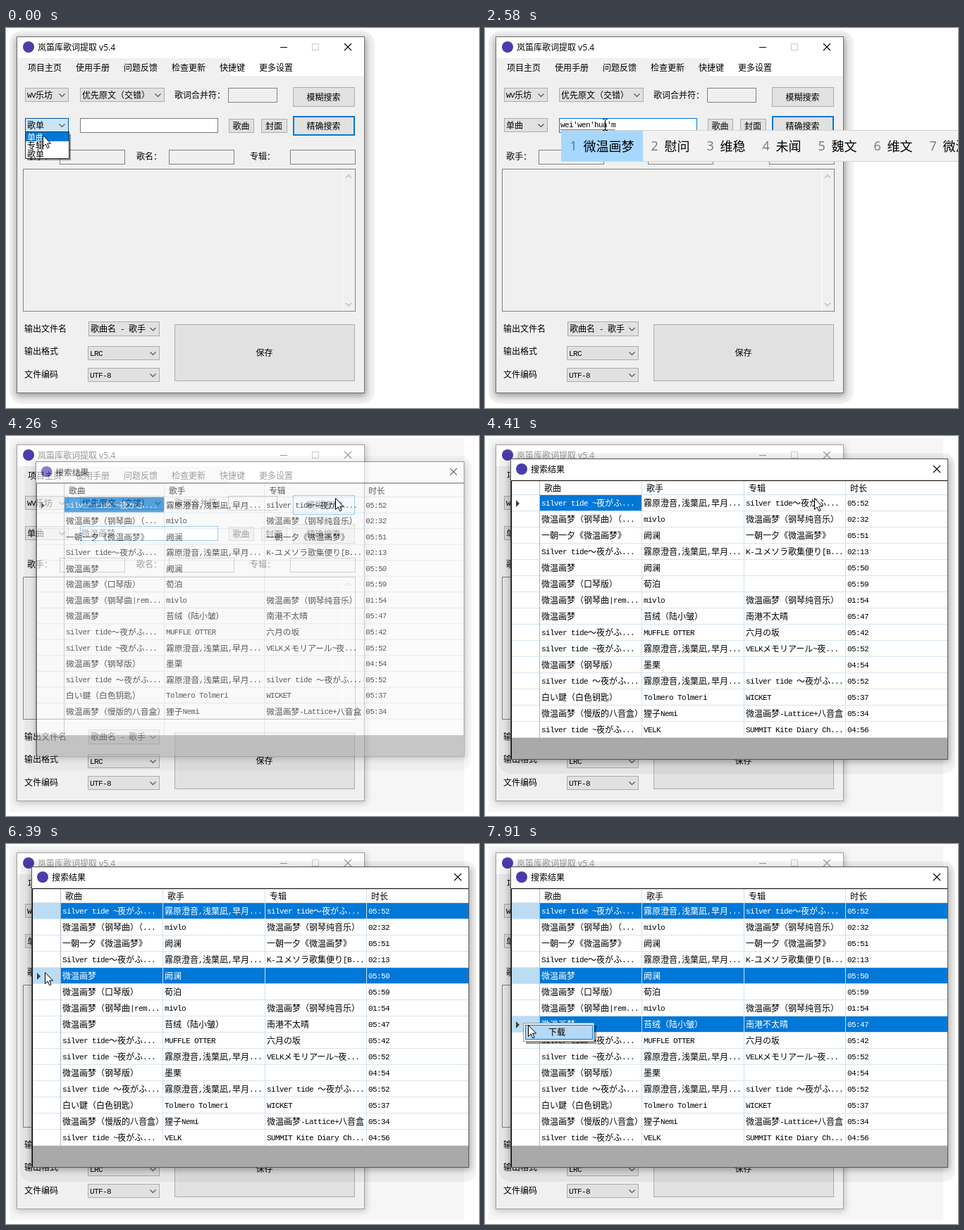
Animation, 671 px wide and 540 px high, one loop 8000 ms. Source, as an HTML page:

```html
<!DOCTYPE html>
<html lang="zh-CN">
<head>
<meta charset="utf-8">
<title>歌词提取</title>
<style>
  html, body { margin: 0; width: 100%; height: 100%; overflow: hidden; background: #fff; }
  svg { display: block; width: 100%; height: 100%; }
  text { font: 12px "Noto Sans CJK SC", "Noto Sans CJK", sans-serif; white-space: pre; }
  .m { font: 11px "Liberation Mono", monospace; letter-spacing: -.6px; baseline-shift: 1px; }
  .u { font-family: "Open Sans", "Noto Sans CJK SC", "Noto Sans CJK", sans-serif; }
  .ime { font-size: 18px; }
</style>
</head>
<body>
<svg viewBox="0 0 671 540" preserveAspectRatio="none">
  <defs>
    <filter id="soft" x="-10%" y="-10%" width="120%" height="120%"><feGaussianBlur stdDeviation="5"/></filter>
  </defs>
  <g id="scene"></g>
</svg>
<script>
const LOOP = 8000;
const BLUE = '#0078d7', EDGE = '#adadad', FACE = '#e1e1e1', BACK = '#f0f0f0';
const scene = document.getElementById('scene');

// Bursts of screen updates: first, last, count
const steps = [
  [370, 920, 9], [1290, 1410, 2], [1620, 1620, 1], [1770, 1980, 4], [2190, 2190, 1],
  [2340, 2580, 4], [3010, 3010, 1], [3220, 3580, 7], [3730, 3860, 3], [4200, 4260, 2],
  [4350, 4950, 10], [5100, 5160, 2], [5250, 5500, 5], [5650, 5800, 3], [6390, 6390, 1],
  [6480, 6900, 7], [7220, 7460, 4], [7760, 7910, 3]
].flatMap(([a, b, n]) => Array.from({ length: n }, (_, i) => Math.round(a + (b - a) * i / Math.max(1, n - 1))));

// Pointer: time, x, y
const route = [
  [0, 52, 152], [370, 52, 152], [439, 60, 151], [714, 170, 137], [3160, 170, 137],
  [3460, 440, 80], [3580, 467, 88], [4400, 467, 88], [4680, 250, 104], [4950, 55, 98],
  [5160, 55, 98], [5500, 55, 167], [5590, 55, 167], [5800, 55, 182], [6400, 55, 182],
  [6900, 55, 251], [7220, 55, 251], [7460, 55, 254], [7760, 55, 254], [7910, 61, 257], [LOOP, 61, 257]
];

const words = s => s.split(' ');
const wen = '慰问 维稳 未闻 魏文 维文 微温';
const typing = [
  [920, 'w', words('我 为 无 问 玩 外 位')],
  [1290, 'we', words('我 为 无 问 玩 外 位')],
  [1410, 'we', words('我 为 位 未 喂 威 微')],
  [1620, 'wei', words('位 为 未 喂 (#`O′) 维 魏')],
  [1770, "wei'w", words('为我 未完 慰问 微微 委婉 威望 维稳')],
  [1910, "wei'we", words('慰问 维稳 未闻 微微 委婉 威望 维稳')],
  [2190, "wei'wen", words(wen + ' 微文')],
  [2340, "wei'wen'h", words('慰问函 ' + wen)],
  [2420, "wei'wen'hu", words('慰问户 ' + wen)],
  [2500, "wei'wen'hua", words('慰问画 ' + wen)],
  [2580, "wei'wen'hua'm", words('微温画梦 ' + wen)]
];

const song = '微温画梦', cast = '霧原澄音,浅葉凪,早月...';
const rows = [
  ['silver tide ~夜がふ...', cast, 'silver tide～夜がふ...', '05:52'],
  [song + '（钢琴曲）（...', 'mivlo', song + '（钢琴纯音乐）', '02:32'],
  [`一朝一夕《${song}》`, '阙澜', `一朝一夕《${song}》`, '05:51'],
  ['Silver tide～夜がふ...', cast, 'K-ユメソラ歌集便り[B...', '02:13'],
  [song, '阙澜', '', '05:50'],
  [song + '（口琴版）', '荀泊', '', '05:59'],
  [song + '（钢琴曲|rem...', 'mivlo', song + '（钢琴纯音乐）', '01:54'],
  [song, '苔绒（陆小皱）', '南港不太晴', '05:47'],
  ['silver tide～夜がふ...', 'MUFFLE OTTER', '六月の坂', '05:42'],
  ['silver tide ~夜がふ...', cast, 'VELKメモリアール~夜...', '05:52'],
  [song + '（钢琴版）', '墨栗', '', '04:54'],
  ['silver tide ～夜がふ...', cast, 'silver tide ～夜がふ...', '05:52'],
  ['白い鍵（白色钥匙）', 'Tolmero Tolmeri', 'WICKET', '05:37'],
  [song + '（慢版的八音盒）', '狸子Nemi', song + '-Lattice+八音盒', '05:34'],
  ['silver tide ~夜がふ...', 'VELK', 'SUMMIT Kite Diary Ch...', '04:56']
];
const cols = [80, 225, 370, 514];

// Drawing helpers; y of text is its middle
const fill = (x, y, w, h, c, extra = '') => `<rect x="${x}" y="${y}" width="${w}" height="${h}" fill="${c}" ${extra}/>`;
const box = (x1, y1, x2, y2, c, edge, lw = 1) =>
  fill(x1 + lw / 2, y1 + lw / 2, x2 - x1 + 1 - lw, y2 - y1 + 1 - lw, c, `stroke="${edge}" stroke-width="${lw}"`);
const line = (d, c, w = 1) => `<path d="${d}" fill="none" stroke="${c}" stroke-width="${w}"/>`;
const mono = s => s.replace(/[\x20-\x7e]+/g, m => `<tspan class="m">${m}</tspan>`);
const text = (x, y, s, c = '#000', anchor = 'start') =>
  `<text x="${x}" y="${y + 4.5}" fill="${c}" text-anchor="${anchor}">${mono(s)}</text>`;
const ui = (x, y, s, c = '#000', cls = '') => `<text class="u ${cls}" x="${x}" y="${y}" fill="${c}">${s}</text>`;
const chevron = (x, y, c = '#505050', k = 1) => line(`M${x - 4} ${y - 2 * k}l4 ${4 * k}l4 ${-4 * k}`, c, 1.1);
const combo = (x1, y1, x2, y2, s, hot) => box(x1, y1, x2, y2, hot ? '#cce4f7' : FACE, hot ? '#005499' : EDGE) +
  text(x1 + 3, (y1 + y2) / 2 + .5, s) + chevron(x2 - 8.5, (y1 + y2) / 2 + 1);
const button = (x1, y1, x2, y2, s, c = FACE, edge = EDGE, lw = 1) => box(x1, y1, x2, y2, c, edge, lw) +
  text((x1 + x2) / 2, (y1 + y2) / 2 + .5, s, '#000', 'middle');
const field = (x1, y1, x2, y2) => box(x1, y1, x2, y2, BACK, '#838383');
const logo = (x, y) => `<circle cx="${x}" cy="${y}" r="8" fill="#4a3cae"/>`;
const cross = (x, y, c) => line(`M${x - 5} ${y - 5}l10 10m0 -10l-10 10`, c, 1.1);
const shade = (x, y, w, h, o) => fill(x, y, w, h, '#000', `opacity="${o}" filter="url(#soft)"`);

function snap(t) {
  let last = 0;
  for (const s of steps) if (s <= t) last = s;
  return last;
}

function pointer(t) {
  const i = route.findIndex(k => k[0] > t);
  const [t0, x0, y0] = route[i - 1], [t1, x1, y1] = route[i];
  const p = (t - t0) / (t1 - t0);
  return [Math.round(x0 + (x1 - x0) * p), Math.round(y0 + (y1 - y0) * p)];
}

function mainWindow(t) {
  const idle = t >= 4200, ink = idle ? '#999' : '#000';
  const open = t < 370;
  let s = idle
    ? fill(5, 3, 645, 531, '#f6f6f6') + shade(14, 13, 497, 509, .2)
    : fill(5, 4, 518, 530, '#f1f1f1', 'rx="18"') + shade(14, 14, 497, 509, .36);
  s += box(15, 12, 508, 518, BACK, idle ? '#a0a0a0' : '#707070') + fill(16, 13, 492, 30, '#fff') + fill(318, 43, 190, 25, '#fff');
  s += logo(32, 27) + ui(45, 32, '岚笛库歌词提取 v5.4', ink);
  s += line('M389 27.5h10', ink) + box(434, 22, 443, 31, 'none', '#ccc') + cross(485, 27, ink);
  ['项目主页', '使用手册', '问题反馈', '检查更新', '快捷键', '更多设置'].forEach((m, i) =>
    s += ui([31, 99, 167, 235, 303, 359][i], 60.5, m));

  s += combo(27, 85, 88, 104, 'WV乐坊') + combo(105, 85, 224, 104, '优先原文（交错）');
  s += text(239, 95, '歌词合并符：') + field(315, 85, 384, 105);
  const fuzzy = t < 3580 ? [] : t < 3730 ? ['#e5f1fb', BLUE] : t < 3800 ? ['#cce4f7', '#005499'] : ['#e5f1fb', BLUE];
  s += button(407, 84, 494, 111, '模糊搜索', ...fuzzy);
  s += combo(27, 128, 88, 147, open ? '歌单' : '单曲', t < 439);
  s += box(105, 128, 300, 148, '#fff', t >= 783 ? BLUE : '#7a7a7a');
  s += button(316, 129, 351, 148, '歌曲') + button(362, 129, 398, 148, '封面');
  s += t < 3730 ? button(407, 125, 494, 152, '精确搜索', FACE, BLUE, 2) : button(407, 125, 494, 152, '精确搜索');

  [['歌手：', 30, 76, 168], ['歌名：', 185, 231, 323], ['专辑：', 346, 403, 495]].forEach(([n, x, a, b]) =>
    s += text(x, 182.5, n) + field(a, 173, b, 193));
  s += box(24, 200, 495, 402, BACK, '#828282') + line('M477.5 201v201', '#fff');
  s += chevron(486, 211, '#b5b5b5', -1) + chevron(486, 393, '#b5b5b5');
  s += text(26, 427, '输出文件名') + text(26, 459, '输出格式') + text(26, 492.5, '文件编码');
  s += combo(117, 417, 217, 437, '歌曲名 - 歌手') + combo(116, 452, 217, 471, 'LRC') + combo(116, 483, 217, 502, 'UTF-8');
  s += button(239, 421, 494, 501, '保存');

  if (open) {
    s += fill(30, 151, 62, 37, '#000', 'opacity=".4"') + box(27, 147, 89, 185, '#fff', '#303030') + fill(28, 148, 61, 13, BLUE);
    ['单曲', '专辑', '歌单'].forEach((n, i) => s += text(30, 155 + 12 * i, n, i ? '#000' : '#fff'));
  }
  if (t >= 3010) s += text(107, 138, song);
  return s;
}

function ime(t) {
  if (t < 920 || t >= 3010) return '';
  const [, typed, list] = typing.filter(k => k[0] <= t).pop();
  let s = text(107, 137.5, typed);
  s += `<path d="M107 144.5h${typed.length * 6}" stroke="#000" stroke-dasharray="1 1"/>`;
  let x = 108, cells = '';
  list.forEach((w, i) => {
    const wide = 43 + (w[0] === '(' ? 49 : 18 * w.length);
    if (!i) cells += fill(x, 146, wide + 1, 43, '#a6d8ff');
    cells += ui(x + 12.5, 174, i + 1, i ? '#767676' : '#55758c', 'ime') + ui(x + 31.5, 174.5, w, '#000', 'ime');
    x += wide;
  });
  s += box(108, 145, x + 114, 189, '#f2f2f2', '#d2d2d2') + cells;
  s += line(`M${x + .5} 146v43m65 0v-43`, '#d8d8d8');
  s += line(`M${x + 18} 162l-5 6l5 6`, '#aaa', 1.3) + line(`M${x + 48} 162l5 6l-5 6`, '#222', 1.3);
  const f = x + 90;
  s += `<circle cx="${f}" cy="168" r="7.5" fill="none" stroke="#222" stroke-width="1.2"/>`;
  s += line(`M${f - 4} 170q4 5 8 0`, '#222', 1.2) + fill(f - 4, 165, 2, 2, '#222') + fill(f + 2, 165, 2, 2, '#222');
  return s;
}

function results(t, [mx, my]) {
  if (t < 4200) return '';
  const p = Math.min(1, (t - 4180) / 160), q = 1 - p;
  const scale = 1 - .16 * q ** 3, alpha = 1 - q ** 1.4;
  const picked = [[0, 5100], [4, 6390], [7, 7220]].filter(k => t >= k[1]).map(k => k[0]);
  const current = picked.length ? picked[picked.length - 1] : 0;
  const hover = mx < 77 ? Math.floor((my - 84) / 23) : -1;

  let s = fill(20, 24, 647, 456, '#000', 'rx="16" opacity=".05"') + shade(35, 35, 624, 428, .3);
  s += box(36, 32, 656, 459, '#fff', '#555') + fill(37, 429, 619, 30, '#a9a9a9');
  s += logo(52, 47) + ui(65, 52, '搜索结果') + cross(641, 47, '#000');
  ['歌曲', '歌手', '专辑', '时长'].forEach((n, i) => s += ui(cols[i] + 4, 78.5, n));

  rows.forEach((row, i) => {
    if (i === 14 && t < 4350) return;
    const y = 84 + 23 * i, on = picked.includes(i), cell = !picked.length && !i;
    if (on) s += fill(78, y, 578, 22, BLUE);
    if (cell) s += fill(78, y, 144, 22, BLUE);
    if (on || i === hover) s += fill(38, y, 39, 22, on ? '#bcdcf4' : '#d9ebf9');
    s += line(`M38 ${y + 22.5}h618`, '#d5e5f2');
    row.forEach((v, c) => s += text(cols[c], y + 11.5, v, on || cell && !c ? '#fff' : '#000'));
    if (i === current) s += `<path d="M44 ${y + 7}l5 5l-5 5z" fill="#404040"/>`;
  });
  s += line('M38 83.5h618M222.5 64v365M367.5 64v365M511.5 64v365', '#d0e1ef');
  s += line('M77.5 64v365', '#b0b8c0') + line('M37.5 459V63.5H656', '#000');

  if (t >= 7760) {
    const hot = t >= 7910;
    s += fill(58, 258, 100, 26, '#000', 'opacity=".4"') + box(54, 254, 154, 280, '#f2f2f2', '#979797');
    if (hot) s += box(57, 257, 152, 277, '#b5d8f4', BLUE);
    s += ui(90, 271.5, '下载');
  }
  return `<g opacity="${alpha}" transform="translate(330 235) scale(${scale}) translate(-330 -235)">${s}</g>`;
}

function cursor(t, [x, y]) {
  if (t < 4200 && x > 105 && x < 300 && y > 127 && y < 149)
    return line(`M${x - 3} ${y - 7.5}h2.5l1 1l1 -1h2.5M${x + .5} ${y - 7}v15M${x - 3} ${y + 8.5}h2.5l1 -1l1 1h2.5`, '#000');
  return `<path transform="translate(${x + .5} ${y + .5})" d="M0 0V16L3.7 12.5L6.2 18.2L8.6 17.2L6.2 11.6H11Z" fill="#fff" stroke="#000"/>`;
}

let shown = -1;
function tick(now) {
  const t = snap(now % LOOP);
  if (t !== shown) {
    const at = pointer(t);
    scene.innerHTML = mainWindow(t) + ime(t) + results(t, at) + cursor(t, at);
    shown = t;
  }
  requestAnimationFrame(tick);
}
tick(performance.now());
</script>
</body>
</html>
```
